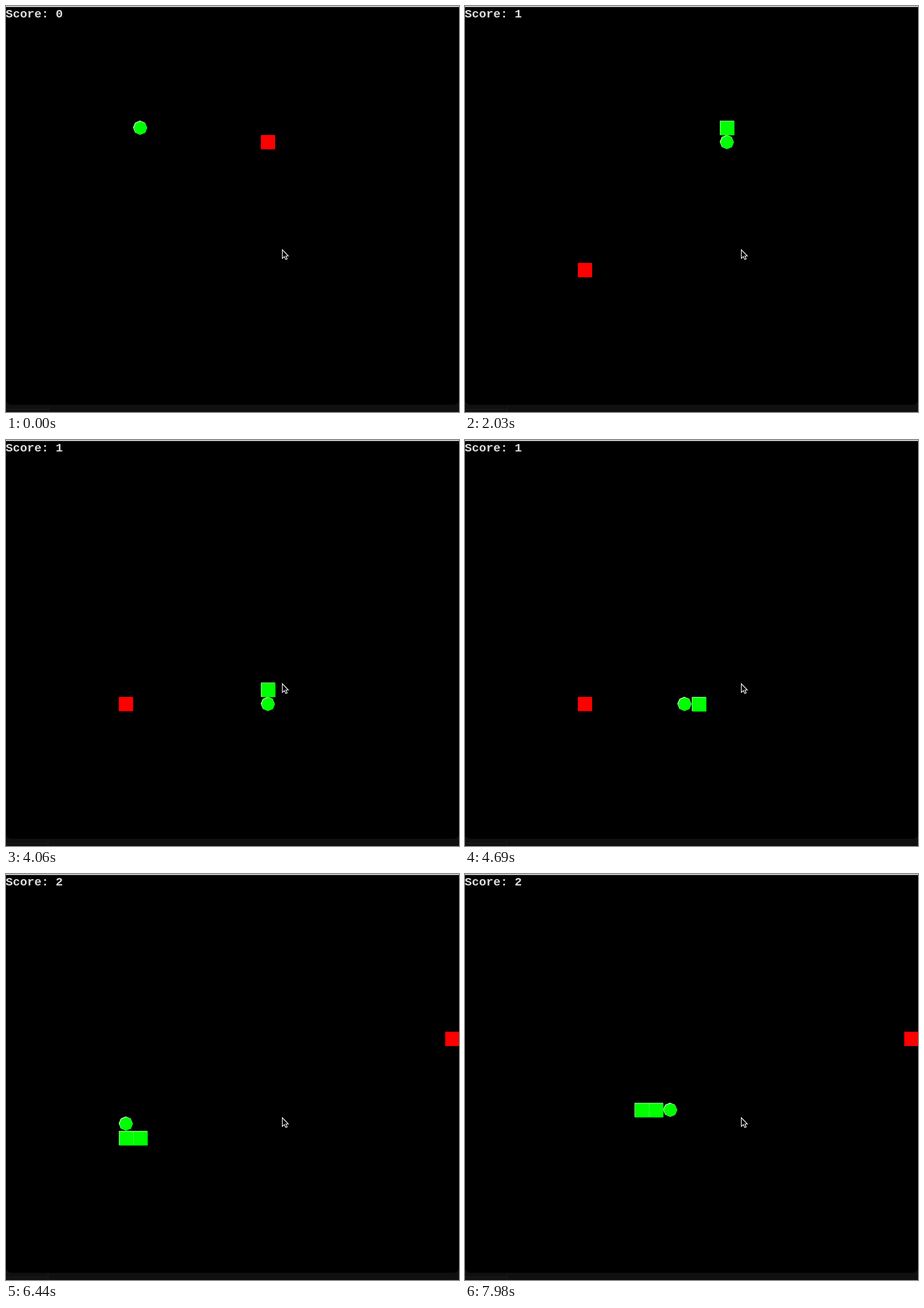
These frames come from a looping animation (791 by 708 pixels, 8000 ms). An HTML page with a canvas:

```html
<!DOCTYPE html>
<html lang="en">
<head>
<meta charset="utf-8">
<title>Snake</title>
<style>
  html, body { margin: 0; height: 100%; overflow: hidden; background: #101010; }
  canvas { display: block; }
</style>
</head>
<body>
<canvas id="stage" width="791" height="708"></canvas>
<script>
const ctx = document.getElementById('stage').getContext('2d');
const LOOP = 8000, CELL = 24.78;

// Snake moves, one per tick
const DIRS = { R: [1, 0], D: [0, 1], L: [-1, 0], U: [0, -1] };
const moves = 'R'.repeat(9) + 'D'.repeat(10) + 'L'.repeat(10) + 'UU' + 'R'.repeat(6);
const trail = [[9, 8]];
for (const m of moves) {
  const [x, y] = trail[trail.length - 1];
  trail.push([x + DIRS[m][0], y + DIRS[m][1]]);
}
const foods = [[18, 9], [8, 18], [31, 11]];
const meals = [10, 29];            // moves on which food is eaten
const lateMoves = [7, 12, 18, 24, 30]; // moves that come 70 ms late

const ticks = [];
for (let i = 0, t = 70; i < moves.length; i++, t += 210) {
  if (lateMoves.includes(i)) t += 70;
  ticks.push(t);
}

const px = col => Math.round(col * CELL - 0.9);
const py = row => Math.round(row * CELL + 2.05);

function square([col, row], color, inset, size) {
  ctx.fillStyle = color;
  ctx.fillRect(px(col) + inset, py(row) + inset, size, size);
}

function octagon([col, row], color, shift, r) {
  ctx.fillStyle = color;
  ctx.beginPath();
  for (let i = 0; i < 8; i++) {
    const a = i * Math.PI / 4;
    ctx.lineTo(px(col) + 12.3 + shift + r * Math.cos(a), py(row) + 12.3 + shift + r * Math.sin(a));
  }
  ctx.fill();
}

function drawWindow() {
  ctx.fillStyle = '#101010';
  ctx.fillRect(0, 0, 791, 708);
  ctx.fillStyle = '#1e1e1e';
  ctx.fillRect(0, 703, 74, 1);
  ctx.fillRect(73, 697, 1, 11);
  ctx.fillStyle = '#000';
  ctx.beginPath();
  ctx.roundRect(0, 0, 791, 695.5, [0, 0, 9, 9]);
  ctx.fill();
  ctx.fillStyle = '#eee';
  ctx.fillRect(0, 0, 791, 1.6);
}

function drawCursor() {
  const shape = new Path2D('M482.5 425V440.2L486 437L488.5 442L491 441L488.7 436H493Z');
  ctx.fillStyle = '#000';
  ctx.fill(shape);
  ctx.strokeStyle = '#fff';
  ctx.lineWidth = 1.2;
  ctx.stroke(shape);
}

function draw(time) {
  const step = ticks.filter(t => t <= time).length;
  const score = meals.filter(m => m <= step).length;
  const head = trail[step];
  const body = trail.slice(step - score, step);

  drawWindow();
  ctx.fillStyle = '#ddd';
  ctx.font = 'bold 20.8px "Liberation Mono", monospace';
  ctx.fillText('Score: ' + score, -0.5, 19.5);

  square(foods[score], '#f00', 0, 25);
  octagon(head, '#d8ffd8', -0.2, 12.3);
  octagon(head, '#0f0', 0.5, 11.8);
  body.forEach(c => square(c, '#a0ffa0', 0, 25));
  body.forEach(c => square(c, '#0f0', 1, 24.5));
  drawCursor();
}

const start = performance.now();
function frame() {
  draw((performance.now() - start) % LOOP);
  requestAnimationFrame(frame);
}
frame();
</script>
</body>
</html>
```
